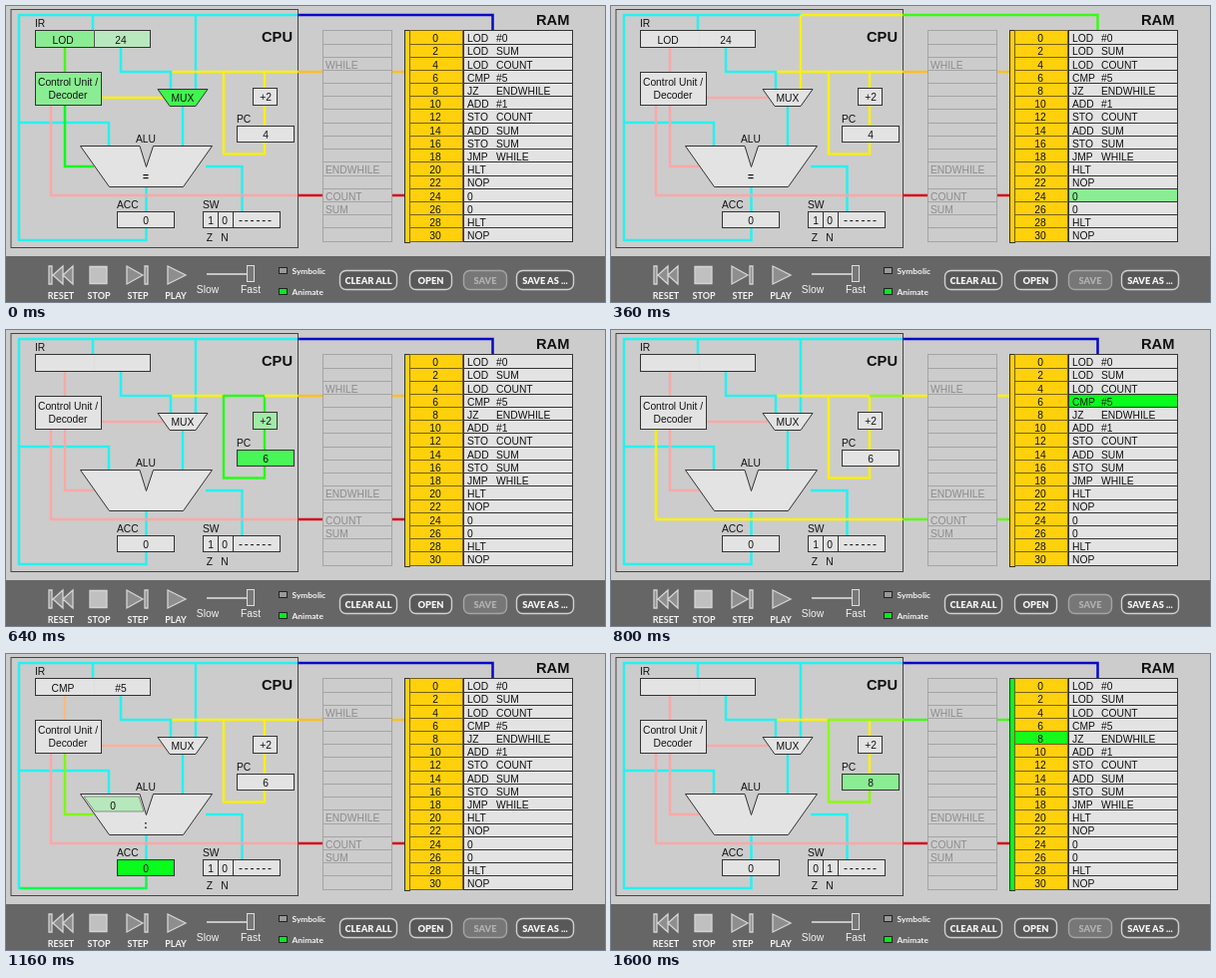
Recreate the animation shown at these times as an HTML page. Size 600 by 297 pixels, loop 1640 ms.

```html
<!DOCTYPE html>
<html lang="en">
<head>
<meta charset="utf-8">
<title>CPU simulator</title>
<style>
html, body { margin: 0; width: 100%; height: 100%; overflow: hidden; background: #ccc; }
svg { display: block; width: 600px; height: 297px; }
text { font: 10.3px "Liberation Sans", Arial, sans-serif; fill: #111; }
.mid { text-anchor: middle; }
.big { font-size: 14.7px; font-weight: 700; }
.bold { font-weight: 700; }
.dim { fill: #8c8c8c; }
.box { fill: #e3e3e3; stroke: #333; }
.wire { fill: none; stroke-width: 2.5; }
.ui text { font: 700 9px Lato, "Open Sans", sans-serif; fill: #f4f4f4; }
.ui .plain { font: 10.3px "Liberation Sans", Arial, sans-serif; }
.ui .key { font-size: 9.3px; font-weight: 900; }
.ui .off { fill: #b0b0b0; }
.icon { fill: #8e8e8e; stroke: #d4d4d4; stroke-width: 1.3; }
</style>
</head>
<body>
<svg id="stage" viewBox="0 0 600 297"></svg>
<script>
const LOOP = 1640, STEP = 40;
const CYAN = [40, 240, 240], BLUE = [8, 8, 200], YELLOW = [248, 240, 16], AMBER = [248, 192, 36],
  PINK = [249, 168, 168], RED = [214, 10, 20], GRAY = [227, 227, 227], GOLD = [255, 208, 12],
  GREEN = [8, 252, 28], LIME = [140, 250, 10], SPRING = [20, 245, 125];
const stage = document.getElementById('stage');
const lit = [];

function add(tag, attrs, parent = stage) {
  const el = document.createElementNS('http://www.w3.org/2000/svg', tag);
  for (const key in attrs) el.setAttribute(key, attrs[key]);
  return parent.appendChild(el);
}
function label(x, y, str, cls = '', parent = stage) {
  const el = add('text', { x, y, class: cls }, parent);
  el.textContent = str;
  return el;
}
const rect = (x, y, x2, y2, cls = 'box', parent = stage) =>
  add('rect', { x: x + .5, y: y + .5, width: x2 - x, height: y2 - y, class: cls }, parent);

// A pulse is a start time, or [start, length]; it rises for a third and fades for the rest.
function glow(pulses, t) {
  return Math.max(0, ...pulses.map(p => {
    const [start, len] = [].concat(p, 240);
    return Math.min(1, (t - start) * 3 / len, (start + len - t) * 1.5 / len);
  }));
}
const mix = (a, b, k) => a.map((v, i) => Math.round(v + (b[i] - v) * k));
const rgb = c => `rgb(${c})`;

function light(el, base, pulses) {
  lit.push(t => { el.style.fill = rgb(mix(base, GREEN, glow(pulses, t))); });
  return el;
}
function wire(d, base, pulses = [], half = YELLOW) {
  const el = add('path', { d, class: 'wire', stroke: rgb(base) });
  if (!pulses.length) return;
  lit.push(t => {
    const k = glow(pulses, t) * 2;
    el.setAttribute('stroke', rgb(k < 1 ? mix(base, half, k) : mix(half, GREEN, k - 1)));
  });
}

add('rect', { width: 600, height: 252, fill: '#ccc' });
add('rect', { x: 5, y: 3.5, width: 287.5, height: 239, fill: 'none', stroke: '#444' });

// Data bus
wire('M13 118V9H87', CYAN);
wire('M87 9H190', CYAN, [[820, 210]]);
wire('M87 9V25', CYAN, [[830, 210]]);
wire('M190 9V83', CYAN, [320]);
wire('M190 9H292', CYAN, [320, [810, 210]]);
wire('M292 9H487.500V25', BLUE, [264, [800, 220]]);

// Accumulator and flags
wire('M140.500 222V235H13', CYAN, [1100], SPRING);
wire('M13 236V117H103V141', CYAN, [1160], SPRING);
wire('M140.500 182V206', CYAN, [380], SPRING);
wire('M200 161H236.500V206', CYAN, [1340], SPRING);

// Control lines
wire('M45 99V190H292', PINK, [100, 640]);
wire('M292 190H400', RED, [110, 690]);
wire('M59 99V161H88', PINK, [-80, 1040]);
wire('M96 92H157', PINK, [-160, 930]);
wire('M59 41V66', PINK, [-100, 940]);

// Address lines
wire('M165 66H218', YELLOW, [40], LIME);
wire('M115 41V66H165V83', CYAN, [30, 1160]);
wire('M177 101V141', CYAN, [360, 1160]);
wire('M259 66V82M259 100V121', YELLOW, [540, [1360, 200]], LIME);
wire('M259 66H292', YELLOW, [50, 640, 1440], LIME);
wire('M292 66H400', AMBER, [60, 640, 1500]);
wire('M218 66H259', YELLOW, [40, 540, 1440], LIME);
wire('M218 65V148.500H259V137', YELLOW, [540, 1440], LIME);

// CPU parts
label(256, 36, 'CPU', 'big');
label(29, 21, 'IR');
light(rect(29, 24, 88, 41, ''), GRAY, [-176, 880]);
light(rect(88, 24, 144, 41, ''), GRAY, [-210, 20, 864, 1232]);
rect(29, 24, 144, 41).style.fill = 'none';
const split = add('path', { d: 'M88.5 24V41', stroke: '#555' });
const op = label(57, 37.5, '', 'mid'), arg = label(115, 37.5, '', 'mid');

light(rect(29, 66, 95, 99), GRAY, [-176, 896]);
label(62, 80, 'Control Unit /', 'mid');
label(62, 93, 'Decoder', 'mid');

light(add('path', { d: 'M152 83.500H202L190 100.500H164Z', class: 'box' }), GRAY, [-120, 920]);
label(177, 95.5, 'MUX', 'mid');
light(rect(247, 82, 271, 99), GRAY, [448, [1380, 200]]);
label(260, 95, '+2', 'mid');
label(231, 116.5, 'PC');
light(rect(231, 120, 288, 136), GRAY, [512, 1424]);
const pc = label(260, 133, '', 'mid');

label(130, 137, 'ALU');
add('path', { d: 'M74.500 140.500H134L140.500 161.500L147.500 140.500H206.500L177.500 181.500H103.500Z', class: 'box' });
function field(d, x, pulses, value) {
  const g = add('g', {});
  light(add('path', { d, stroke: '#555', 'stroke-width': .6 }, g), GRAY, pulses);
  const txt = label(x, 155.5, '', 'mid', g);
  lit.push(t => {
    g.style.display = glow(pulses, t) ? '' : 'none';
    txt.textContent = value(t);
  });
}
field('M78 143H133L138 158H89Z', 107, [1144], () => 0);
field('M148.500 143H203L192 158H143.500Z', 175, [360, 1230], t => t < 800 ? 0 : 5);
const sign = label(140, 175, '', 'mid bold');

label(111, 203, 'ACC');
light(rect(111, 206, 168, 222), GRAY, [400, 1080]);
label(140, 218.5, '0', 'mid');
label(197, 203, 'SW');
light(rect(197, 206, 212, 222), GRAY, [1360]);
light(rect(212, 206, 227, 222), GRAY, [1360]);
rect(227, 206, 274, 222);
const zero = label(205, 218.5, '', 'mid'), neg = label(219, 218.5, '', 'mid');
label(233, 218.5, '------').setAttribute('style', 'font-size:12px;letter-spacing:1.8px');
label(204, 236, 'Z', 'mid');
label(219, 236, 'N', 'mid');

// Symbols and memory
const code = ['LOD #0', 'LOD SUM', 'LOD COUNT', 'CMP #5', 'JZ ENDWHILE', 'ADD #1', 'STO COUNT', 'ADD SUM',
  'STO SUM', 'JMP WHILE', 'HLT', 'NOP', '0', '0', 'HLT', 'NOP'];
const symbols = { 2: 'WHILE', 10: 'ENDWHILE', 12: 'COUNT', 13: 'SUM' };
const fetches = { 3: [[640, 150]], 4: [1510], 12: [80] };
const reads = { 3: [720], 12: [184] };
const rowY = i => Math.round(24.3 + i * 13.2);

label(531, 19, 'RAM', 'big');
light(rect(399, 24, 404, 237), GOLD, [80, [640, 150], 1520]);
code.forEach((line, i) => {
  const y = rowY(i), y2 = rowY(i + 1), base = 36.1 + i * 13.2;
  rect(317, y, 386, y2, '').setAttribute('style', 'fill:#ccc;stroke:#a4a4a4');
  if (symbols[i]) label(320, base, symbols[i], 'dim');
  light(rect(404, y, 457, y2), GOLD, fetches[i] || []).style.stroke = '#76601c';
  light(rect(458, y, 567, y2), GRAY, reads[i] || []);
  label(430, base, i * 2, 'mid');
  const [name, operand = ''] = line.split(' ');
  label(462, base, name);
  label(491, base, operand);
});

// Control bar
const ui = add('g', { class: 'ui' });
add('rect', { y: 251, width: 600, height: 46, fill: '#666' }, ui);
const icon = d => add('path', { d, class: 'icon' }, ui);
icon('M43 261H46V279H43ZM57 261V279L47 270ZM67 261V279L57 270Z');
icon('M84 261.500H101V278.500H84Z').style.fill = '#c0c0c0';
icon('M121 261V279L137 270ZM139 261H142V279H139Z');
icon('M162 261V279L180 270Z');
[[55, 'RESET'], [93, 'STOP'], [132, 'STEP'], [170, 'PLAY']].forEach(([x, s]) => label(x, 293.5, s, 'mid', ui));
add('path', { d: 'M201 269H241', stroke: '#e4e4e4', 'stroke-width': 1.5 }, ui);
add('rect', { x: 241.5, y: 260.5, width: 7, height: 16, fill: '#777', stroke: '#ddd' }, ui);
label(202, 287.5, 'Slow', 'mid plain', ui);
label(245, 287.5, 'Fast', 'mid plain', ui);

function check(y, fill, str) {
  add('rect', { x: 273.5, y: y + .5, width: 8, height: 6, fill, stroke: '#222' }, ui);
  label(286.5, y + 6.5, str, '', ui).style.fontSize = '8.4px';
}
check(262, '#999', 'Symbolic');
check(283, '#0e2', 'Animate');

function button(x, x2, str, off) {
  add('rect', { x: x + .5, y: 265.5, width: x2 - x - 1, height: 19, rx: 6,
    fill: off ? '#777' : '#585858', stroke: off ? '#a4a4a4' : '#d0d0d0', 'stroke-width': 1.4 }, ui);
  label((x + x2) / 2, 279, str, off ? 'mid key off' : 'mid key', ui);
}
button(334, 392, 'CLEAR ALL');
button(404, 447, 'OPEN');
button(458, 502, 'SAVE', true);
button(511, 569, 'SAVE AS ...');

function draw(t) {
  lit.forEach(update => update(t));
  const first = t < 560, second = t >= 880 && t < 1440;
  op.textContent = first ? 'LOD' : second ? 'CMP' : '';
  arg.textContent = first ? '24' : second ? '#5' : '';
  split.style.display = glow([-210, 864, 1232], t) ? '' : 'none';
  sign.textContent = first ? '=' : second && t >= 1120 ? ':' : '';
  pc.textContent = t < 540 ? 4 : t < 1460 ? 6 : 8;
  zero.textContent = t < 1400 ? 1 : 0;
  neg.textContent = t < 1400 ? 0 : 1;
}
const began = performance.now();
function tick() {
  const t = (performance.now() - began) % LOOP;
  draw(Math.floor(t / STEP) * STEP);
  requestAnimationFrame(tick);
}
tick();
</script>
</body>
</html>
```
